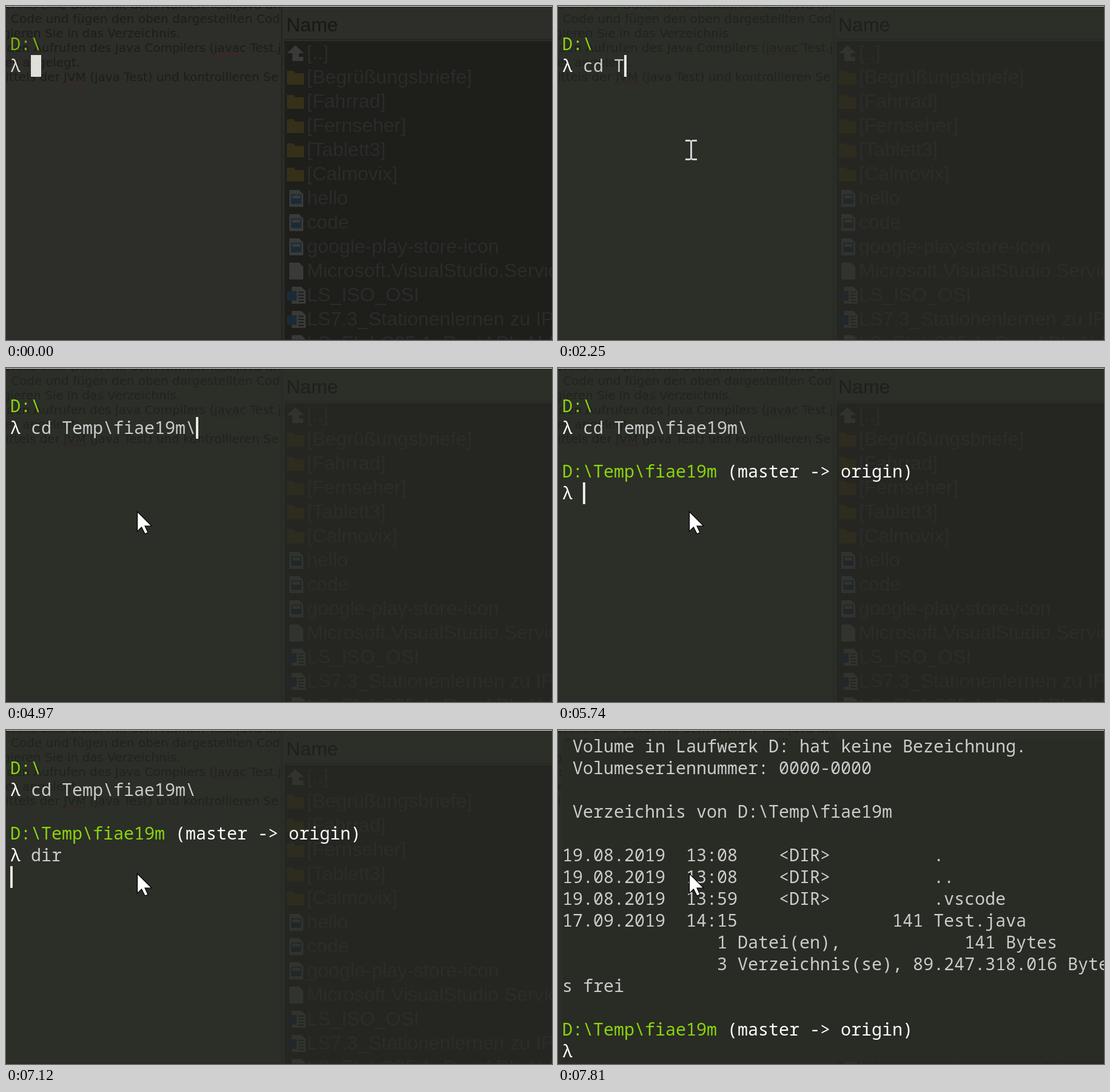
Recreate the animation shown at these times as an HTML page with a canvas. Size 900x552 px, loop 8 s.

```html
<!DOCTYPE html>
<html lang="de">
<head>
<meta charset="utf-8">
<title>Terminal</title>
<style>
  html, body { margin: 0; width: 100%; height: 100%; overflow: hidden; background: #2d2e29; }
  canvas { display: block; }
</style>
</head>
<body>
<canvas id="stage" width="900" height="552"></canvas>
<script>
const ctx = document.getElementById('stage').getContext('2d');
const LOOP = 8000, COL = 17, ROW = 36, LEFT = 7, TOP = 9;
const MONO = '28.333px "Noto Sans Mono", monospace';
const GREY = '#cccccc', WHITE = '#ffffff';
const FOCUS = 640, PROMPT = 5740, LISTED = 7190, DONE = 7350;

const BLURRED = { bg: '#2d2d29', note: '#1d1d1a', wave: '#4a2422', panel: '#1e1e1a', name: '#181816',
  item: '#2a2c2b', folder: '#343019', page: '#393b39', blue: '#1b2a37', edge: '#252521',
  green: '#78b412', lambda: '#dcdcd6' };
const FOCUSED = { bg: '#2c2e28', note: '#212320', wave: '#352622', panel: '#252621', name: '#1f201c',
  item: '#2c2d29', folder: '#2e2c1e', page: '#31332e', blue: '#22272a', edge: '#282a25',
  green: '#8ad60a', lambda: WHITE };

// time, typed command, caret shown
const CD = 'cd Temp\\fiae19m\\';
const TYPING = [
  [0, '', 1], [1180, '', 0], [1640, 'c', 1], [1790, 'cd', 1], [1940, 'cd ', 1],
  [2250, 'cd T', 1], [2390, 'cd Te', 1], [2530, 'cd Temp\\', 1], [3070, 'cd Temp\\', 0],
  [3290, 'cd Temp\\F', 1], [3460, 'cd Temp\\FI', 1], [3990, 'cd Temp\\FIA', 1],
  [4150, 'cd Temp\\FIAE', 1], [4380, 'cd Temp\\FIAE1', 1], [4600, 'cd Temp\\FIAE19', 1],
  [4910, 'cd Temp\\FIAE19M', 1], [4970, CD, 1], [5510, CD, 0], [5600, CD, 1],
  [PROMPT, '', 1], [6280, '', 0], [6450, 'd', 1], [6670, 'di', 1], [6890, 'dir', 1],
  [DONE, '', 1], [7810, '', 0]
];

// time, shape, x, y
const POINTER = [
  [0, 'none', 0, 0], [200, 'beam', 572, 540], [310, 'beam', 450, 430], [420, 'beam', 320, 320],
  [530, 'beam', 219, 238], [2530, 'arrow', 216, 237], [3460, 'beam', 219, 238], [4380, 'arrow', 216, 237]
];

const DAY = '19.08.2019  ', DIR = '    <DIR>          ', pad = n => ' '.repeat(n);
const LISTING = [
  ' Volume in Laufwerk D: hat keine Bezeichnung.',
  ' Volumeseriennummer: 0000-0000',
  '',
  ' Verzeichnis von D:\\Temp\\fiae19m',
  '',
  DAY + '13:08' + DIR + '.',
  DAY + '13:08' + DIR + '..',
  DAY + '13:59' + DIR + '.vscode',
  '17.09.2019  14:15' + pad(15) + '141 Test.java',
  pad(15) + '1 Datei(en),' + pad(12) + '141 Bytes',
  pad(15) + '3 Verzeichnis(se), 89.247.318.016 Byte',
  's frei'
];

const FILES = [
  ['up', '[..]'], ['folder', '[Begrüßungsbriefe]'], ['folder', '[Fahrrad]'], ['folder', '[Fernseher]'],
  ['folder', '[Tablett3]'], ['folder', '[Calmovix]'], ['image', 'hello'], ['image', 'code'],
  ['image', 'google-play-store-icon'], ['page', 'Microsoft.VisualStudio.Services'],
  ['doc', 'LS_ISO_OSI'], ['doc', 'LS7.3_Stationenlernen zu IPv6'], ['doc', 'LS_FI_LC25.1_RestAPI_Abfrage']
];

const at = (list, t) => list.filter(s => s[0] <= t).pop();

function rect(color, x, y, w, h) {
  ctx.fillStyle = color;
  ctx.fillRect(x, y, w, h);
}

function shape(color, points, x = 0, y = 0) {
  ctx.beginPath();
  points.forEach(([px, py]) => ctx.lineTo(x + px, y + py));
  ctx.closePath();
  ctx.fillStyle = color;
  ctx.fill();
}

function label(text, x, y, color, align = 'left') {
  ctx.fillStyle = color;
  ctx.textAlign = align;
  ctx.fillText(text, x, y);
}

function wave(x, end, y, color) {
  ctx.beginPath();
  for (let i = 0; x + i <= end; i += 3) ctx.lineTo(x + i, y + (i % 2) * 3);
  ctx.strokeStyle = color;
  ctx.lineWidth = 1.3;
  ctx.stroke();
}

function drawNotes(p) {
  ctx.save();
  ctx.beginPath();
  ctx.rect(0, 0, 454, 552);
  ctx.clip();
  ctx.font = '20px "DejaVu Sans", sans-serif';
  label('Verzeichnis eine Datei mit dem Namen Test.java an', 453, 5, p.note, 'right');
  label('Code und fügen den oben dargestellten Code', 8, 28, p.note);
  label('Navigieren Sie in das Verzeichnis.', 287, 52, p.note, 'right');
  label('durch den Aufrufen des Java Compilers (', 343, 76, p.note, 'right');
  label('javac Test.java', 343, 76, p.note);
  label('dieses angelegt.', 122, 100, p.note, 'right');
  label('mittels der ', 95, 124, p.note, 'right');
  label('JVM (java Test) und kontrollieren Se', 95, 124, p.note);
  wave(343, 395, 78, p.wave);
  wave(95, 133, 126, p.wave);
  ctx.restore();
}

function drawIcon(kind, y, p) {
  if (kind === 'up') {
    shape(p.page, [[463, 0], [477, -13], [491, 0], [483, 0], [483, 6], [490, 6], [490, 13], [472, 13], [472, 0]], 0, y);
  } else if (kind === 'folder') {
    shape(p.folder, [[463, -11], [474, -11], [477, -7], [491, -7], [491, 12], [463, 12]], 0, y);
  } else {
    const x = kind === 'doc' ? 471 : 467;
    shape(p.page, [[0, -14], [16, -14], [23, -7], [23, 14], [0, 14]], x, y);
    if (kind === 'image') {
      rect(p.blue, 470, y - 7, 17, 16);
      rect(p.page, 472, y - 5, 13, 5);
    }
    if (kind === 'doc') {
      rect(p.blue, 463, y - 7, 16, 16);
      for (let i = -6; i < 12; i += 5) rect(p.panel, 482, y + i, 9, 2);
    }
  }
}

function drawPanel(p) {
  rect(p.edge, 453, 1, 3, 551);
  rect(p.edge, 458, 54, 442, 2);
  rect(p.edge, 458, 54, 2, 498);
  rect(p.panel, 460, 58, 440, 494);
  ctx.font = '32px "Liberation Sans", Arial, sans-serif';
  label('Name', 462, 42, p.name);
  FILES.forEach(([kind, text], i) => {
    const y = 77 + 40 * i;
    drawIcon(kind, y + 1, p);
    label(text, 496, y + 51 - 40, p.item);
  });
}

function write(text, row, color, col = 0) {
  ctx.font = MONO;
  [...text].forEach((c, i) => label(c, LEFT + COL * (col + i), TOP + ROW * row + 28, color));
}

function command(text, row, p) {
  write('λ', row, p.lambda);
  write(text, row, GREY, 2);
}

function folderPrompt(row, p) {
  write('D:\\Temp\\fiae19m', row, p.green);
  write('(master -> origin)', row, WHITE, 16);
}

function drawTerminal(t, p) {
  const [, typed, shown] = at(TYPING, t);
  let row = 2, col = 2 + typed.length;
  if (t < LISTED) {
    write('D:\\', 1, p.green);
    command(t < PROMPT ? typed : CD, 2, p);
    if (t >= 5600 && t < PROMPT) { row = 3; col = 0; }
    if (t >= PROMPT) {
      folderPrompt(4, p);
      command(typed, 5, p);
      row = 5;
      if (t >= 7120) { row = 6; col = 0; }
    }
  } else {
    const first = t < DONE ? 1 : 0;
    row = 14;
    LISTING.forEach((line, i) => write(line, first + i, GREY));
    if (first) {
      command('dir', 0, p);
      col = 0;
    } else {
      folderPrompt(13, p);
      command('', 14, p);
    }
  }
  if (shown) rect(t < FOCUS ? '#dfe0da' : '#e8e8e4', LEFT + COL * col, TOP + ROW * row, t < FOCUS ? COL : 4, ROW);
}

function drawPointer(t) {
  const [, kind, x, y] = at(POINTER, t);
  if (kind === 'beam') {
    const c = '#ced2d4';
    rect(c, x - 1, y - 16, 3, 32);
    for (const dy of [-17, 14]) {
      rect(c, x - 9, y + dy, 8, 3);
      rect(c, x + 2, y + dy, 8, 3);
    }
  } else if (kind === 'arrow') {
    shape(WHITE, [[0.5, 0.5], [0.5, 33], [7.5, 26], [13, 37], [18, 35], [13, 24], [24, 24]], x, y);
    ctx.strokeStyle = '#000';
    ctx.lineWidth = 1.2;
    ctx.stroke();
  }
}

function draw(t) {
  const p = t < FOCUS ? BLURRED : FOCUSED;
  rect(p.bg, 0, 0, 900, 552);
  drawNotes(p);
  drawPanel(p);
  if (t >= DONE) rect('#292b25', 7, 16, 893, 533);
  rect('#e6e6e4', 0, 0, 900, 1);
  rect('#2d2624', 0, 551, 900, 1);
  drawTerminal(t, p);
  drawPointer(t);
}

const start = performance.now();
function tick() {
  draw((performance.now() - start) % LOOP);
  requestAnimationFrame(tick);
}
tick();
</script>
</body>
</html>
```
